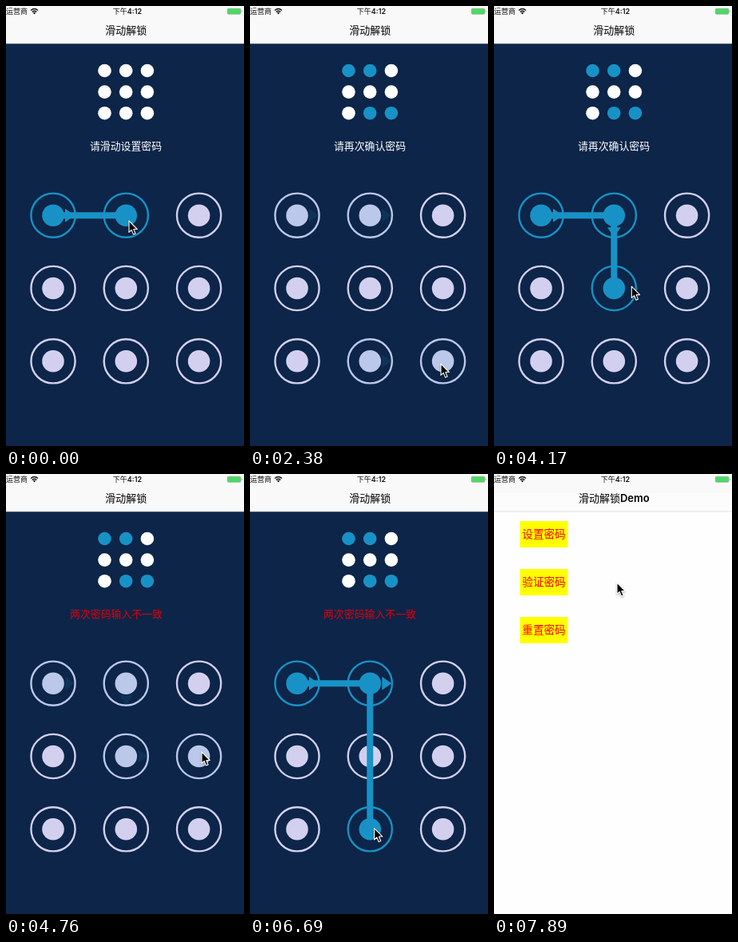
Animation, 298 px wide and 551 px high, one loop 8000 ms. Source, as an HTML page:

```html
<!DOCTYPE html>
<html lang="zh">
<head>
<meta charset="utf-8">
<style>
  html, body { margin: 0; width: 100%; height: 100%; overflow: hidden; background: #fefefe; }
  svg { display: block; font-family: Inter, "Noto Sans CJK SC", "Noto Sans CJK", sans-serif; }
  text { white-space: pre; }
  .cursor { filter: drop-shadow(0 1px 1px #0005); }
</style>
</head>
<body>
<svg id="stage" width="298" height="551" viewBox="0 0 298 551"></svg>
<script>
const LOOP = 8000, STEP = 148.6, RING = 27.6;
const BLUE = [24, 146, 198], LILAC = [211, 208, 239];
const stage = document.getElementById('stage');

// Eased pointer moves, times in steps
const origin = { x: 154, y: 269 };
const moves = [
  { from: 0, to: 5, x: 153, y: 444 },
  { from: 7.2, to: 10.8, x: 239, y: 448 },
  { from: 16, to: 22, x: 49, y: 255 },
  { from: 22, to: 23, x: 125, y: 259 },
  { from: 23, to: 27, x: 153, y: 352 },
  { from: 27, to: 30, x: 245, y: 348 },
  { from: 33, to: 38, x: 74, y: 254 },
  { from: 38, to: 39, x: 154, y: 253 },
  { from: 39, to: 44, x: 153, y: 444 },
  { from: 44.5, to: 47.5, x: 227, y: 432 },
  { from: 52, to: 53, x: 154, y: 136 }
];

// A touch lasts from start to end; its colour then fades from the given level
const gestures = [
  { start: 0, end: 15, fade: .18, path: [0] },
  { start: 22, end: 32, fade: .87, path: [] },
  { start: 38, end: 51, fade: .18, path: [] }
];
const [setup, retry, final] = gestures;

const ease = p => p * p * p * (p * (6 * p - 15) + 10);

function pointer(n) {
  let { x, y } = origin;
  for (const m of moves) {
    const p = ease(Math.min(1, Math.max(0, (n - m.from) / (m.to - m.from))));
    x += (m.x - x) * p;
    y += (m.y - y) * p;
  }
  return [x, y];
}

// The drawn line trails the pointer by one step
const pen = n => pointer(n - 1);
const center = i => [59 + i % 3 * 91.3, 262.2 + Math.floor(i / 3) * 91.3];

// Cells join the path when the pen enters their ring
function pathAt(g, n) {
  const path = [...g.path];
  for (let s = g.start; s <= Math.min(n, g.end - 1); s++) {
    const [x, y] = pen(s);
    for (let i = 0; i < 9; i++) {
      const [cx, cy] = center(i);
      if (!path.includes(i) && Math.hypot(x - cx, y - cy) < RING) path.push(i);
    }
  }
  return path;
}

const rgb = c => `rgb(${c.map(Math.round)})`;
const mix = p => rgb(BLUE.map((v, i) => v + (LILAC[i] - v) * p));
const fadeAt = (g, n) => n < g.end ? 0 : g.fade + .69 * (n - g.end);
const circle = (x, y, r, attrs) => `<circle cx="${x}" cy="${y}" r="${r}" ${attrs}/>`;
const label = (s, x, y, size, fill, attrs = '') =>
  `<text x="${x}" y="${y}" font-size="${size}" fill="${fill}" text-anchor="middle" ${attrs}>${s}</text>`;

function preview(n) {
  const saved = n < setup.end ? [] : pathAt(setup, n);
  let out = '';
  for (let i = 0; i < 9; i++) {
    const fill = saved.includes(i) ? rgb(BLUE) : '#fff';
    out += circle(123.5 + i % 3 * 26.7, 81 + Math.floor(i / 3) * 26.6, 8.3, `fill="${fill}"`);
  }
  return out;
}

function hint(n) {
  const show = (s, fill = '#fff', dx = 0) => label(s, 150 + dx, 180.2, 12.9, fill);
  if (n < setup.end) return show('请滑动设置密码');
  if (n < retry.end) return show('请再次确认密码');
  if (n >= final.end) return show('设置密码成功');
  const shake = Math.round(-12 * (-.6) ** (n - retry.end));
  return show('两次密码输入不一致', '#e0000c', shake);
}

function lock(n) {
  const g = gestures.find(g => n >= g.start && fadeAt(g, n) < 1);
  const path = g ? pathAt(g, n) : [];
  const fade = g ? fadeAt(g, n) : 0;
  let out = '';
  for (let i = 0; i < 9; i++) {
    const color = path.includes(i) ? mix(fade) : rgb(LILAC);
    const [x, y] = center(i);
    out += circle(x, y, RING, `fill="none" stroke="${color}" stroke-width="2.4"`) +
      circle(x, y, 13.8, `fill="${color}"`);
  }
  path.slice(1).forEach((c, i) => {
    const [x, y] = center(path[i]);
    const turn = c - path[i] === 3 ? 90 : 0;
    out += `<path d="M15-8.5L27 0L15 8.5Z" transform="translate(${x} ${y}) rotate(${turn})"
      fill="${rgb(BLUE)}" opacity="${1 - fade}"/>`;
  });
  if (g && n < g.end) {
    out += `<polyline points="${[...path.map(center), pen(n)].join(' ')}" fill="none"
      stroke="${rgb(BLUE)}" stroke-width="8" stroke-linecap="round" stroke-linejoin="round"/>`;
  }
  return out;
}

const menu = ['设置密码', '验证密码', '重置密码'].map((s, i) =>
  `<rect x="32.5" y="${59 + 60 * i}" width="60" height="33" fill="#ff0"/>` +
  label(s, 62.5, 80.2 + 60 * i, 13.6, '#f00')).join('');

const statusBar = `
  <text x="0" y="10" font-size="9" fill="#111">运营商</text>
  <path d="M31 5.4Q35.5 1.4 40 5.4M32.7 7.4Q35.5 4.9 38.3 7.4" fill="none" stroke="#111" stroke-width="1.4"/>
  <path d="M33.9 8.5Q35.5 7.2 37.1 8.5L35.5 10.4Z" fill="#111"/>
  ${label('下午<tspan font-weight="600">4:12</tspan>', 152, 10, 9, '#111', 'font-weight="500"')}
  <rect x="277.3" y="3.2" width="16.6" height="7" rx="1.3" fill="#4cd964" stroke="#8f9a92" stroke-width=".6"/>
  <path d="M294.8 5.3Q296.4 6.7 294.8 8.1Z" fill="#555"/>`;

const title = (s, opacity) =>
  label(s, 150.3, 35.2, 13, '#000', `font-weight="500" opacity="${opacity}"`);

function draw(n) {
  const pop = n < 52 ? 0 : n < 53 ? .6 : 1;
  const [x, y] = pointer(n);
  stage.innerHTML = `
    <rect width="298" height="551" fill="#fefefe"/>
    <g transform="translate(${-90 * (1 - pop)} 0)">${menu}</g>
    <g transform="translate(${298 * pop} 0)">
      <rect y="47" width="298" height="504" fill="#0c2548"/>
      ${preview(n) + hint(n) + lock(n)}
    </g>
    <rect width="298" height="47" fill="#f9f9f9"/>
    <rect y="24" width="298" height="23" fill="#fcfcfc" opacity="${pop}"/>
    <rect y="46.6" width="298" height=".7" fill="#d8d8d8"/>
    ${statusBar + title('滑动解锁', 1 - pop)}
    ${title('滑动解锁<tspan font-weight="600">Demo</tspan>', pop)}
    <path class="cursor" d="M0 0V14.4L3.2 11.4L5.6 17.1L8.1 16L5.8 10.5H10.3Z"
      transform="translate(${x} ${y})" stroke="#fff" stroke-width="1.1" stroke-linejoin="round"/>`;
}

const start = performance.now();
let shown = -1;
function tick() {
  const t = (performance.now() - start) % LOOP;
  const n = Math.min(53, Math.floor((t + 7) / STEP));
  if (n !== shown) draw(shown = n);
  requestAnimationFrame(tick);
}
tick();
</script>
</body>
</html>
```
